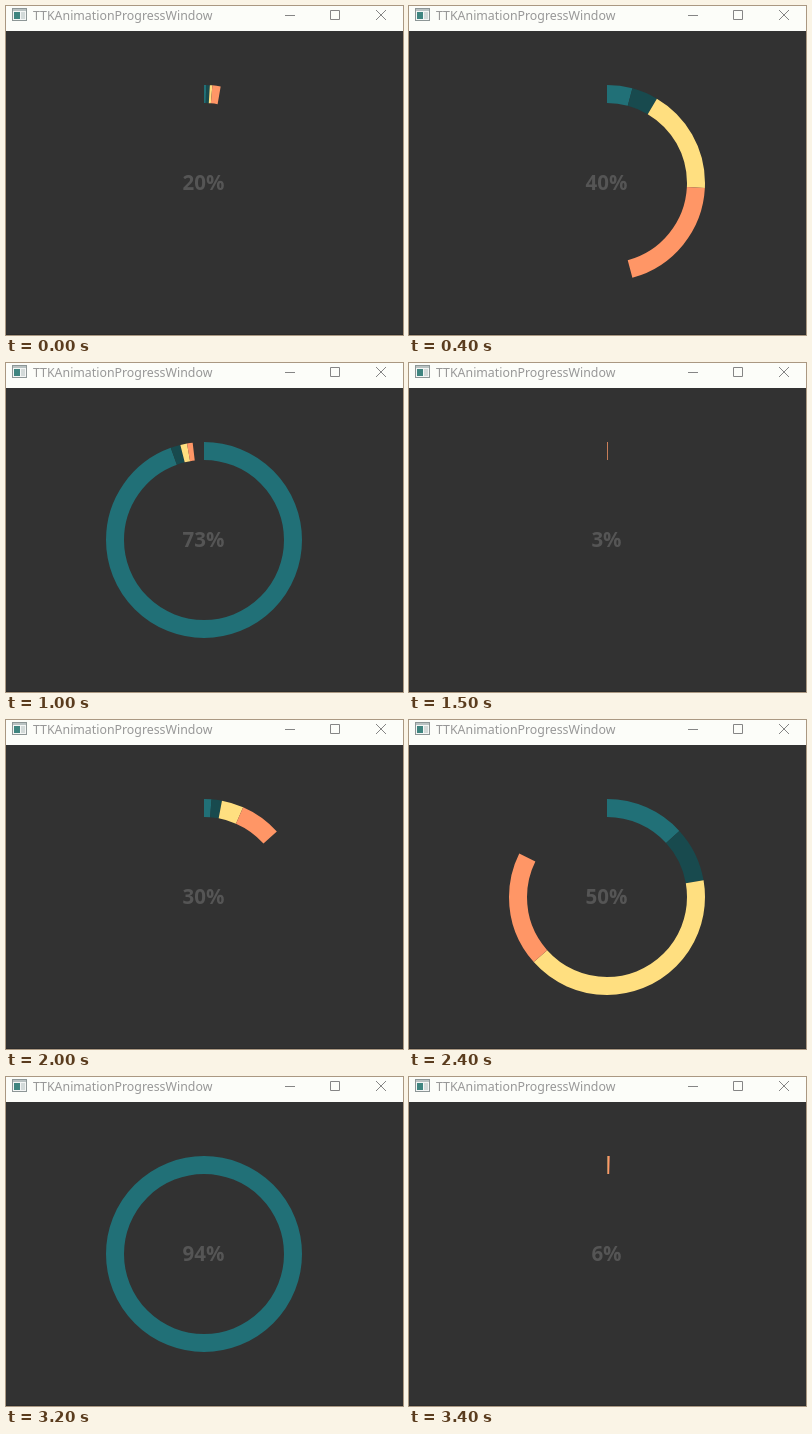
Write an HTML page that moves like this. It is 397 px wide and 329 px high and loops after 3500 ms.

```html
<!DOCTYPE html>
<html lang="en">
<head>
<meta charset="utf-8">
<title>TTKAnimationProgressWindow</title>
<style>
  html, body { margin: 0; width: 100%; height: 100%; overflow: hidden; background: #323232; }
  svg { display: block; }
  text { font-family: "Noto Sans", "Open Sans", sans-serif; }
  #rings circle { fill: none; stroke-width: 18; }
</style>
</head>
<body>
<svg width="397" height="329" viewBox="0 0 397 329">
  <rect width="397" height="329" fill="#323232"/>
  <rect y="328" width="397" height="1" fill="#2b2b2b"/>
  <rect width="397" height="25" fill="#fcfdf9"/>

  <g transform="translate(0 -1)">
    <rect x="6.5" y="3.5" width="14" height="12" fill="#f4f6f5" stroke="#8d9696"/>
    <rect x="7" y="4" width="13" height="2" fill="#b9c2c2"/>
    <rect x="8" y="7" width="6" height="7" fill="#3f8580"/>
    <rect x="15" y="7" width="4" height="7" fill="#d3dad9"/>
  </g>
  <text x="27" y="14" font-size="12.35" fill="#989898">TTKAnimationProgressWindow</text>
  <path d="M279 9.5h10M324.5 4.5h9v9h-9zM370 4l10 10M380 4l-10 10" fill="none" stroke="#858585"/>

  <g id="rings" transform="translate(198 177) rotate(-90)"></g>
  <text id="label" x="197.5" y="184" font-size="20.5" font-weight="700" text-anchor="middle" fill="#555"></text>
</svg>
<script>
const LOOP = 3500, TICK = 100, RADIUS = 89;
const DEGREE = RADIUS * Math.PI / 180;

// Innermost sweep first; degrees reached at 20, 50 and 70 percent.
const rings = [
  { color: "#217077", early: 1.3, half: 47.5, late: 332 },
  { color: "#184a4e", early: 3.5, half: 80, late: 340 },
  { color: "#ffdf80", early: 5, half: 228, late: 345.5 },
  { color: "#ff9666", early: 9.8, half: 296, late: 350 }
];

const logit = deg => Math.log(deg / (360 - deg));
const sigmoid = odds => 360 / (1 + Math.exp(-odds));
const blend = (a, b, k) => sigmoid(logit(a) + (logit(b) - logit(a)) * k);

// Power ease-in, steep S-curve through the middle, cubic ease-out.
function sweepAt(percent, { early, half, late }, power) {
  if (percent < 20) return early * (percent / 20) ** power;
  if (percent < 50) return blend(early, half, (percent - 20) / 30);
  if (percent < 70) return blend(half, late, (percent - 50) / 20);
  return 360 - (360 - late) * ((100 - percent) / 30) ** 3;
}

// The counter gains 5 per tick, and 6 while it runs fast.
function percentAt(tick) {
  const fast = Math.min(Math.max(tick - 7, 0), 10) + Math.max(tick - 28, 0);
  return (20 + 5 * tick + fast) % 100;
}

const group = document.getElementById("rings");
const label = document.getElementById("label");

for (const ring of rings) {
  ring.node = document.createElementNS("http://www.w3.org/2000/svg", "circle");
  ring.node.setAttribute("r", RADIUS);
  ring.node.setAttribute("stroke", ring.color);
  group.append(ring.node);
}

function draw(now) {
  const percent = percentAt(Math.floor(now % LOOP / TICK));
  label.textContent = percent + "%";
  let from = 0;
  rings.forEach((ring, i) => {
    const to = sweepAt(percent, ring, 3 - i / 2);
    const dashes = [0, from, to - from, 720].map(deg => deg * DEGREE);
    ring.node.setAttribute("stroke-dasharray", dashes.join(" "));
    from = to;
  });
}

const start = performance.now();
function loop() {
  draw(performance.now() - start);
  requestAnimationFrame(loop);
}
loop();
</script>
</body>
</html>
```
